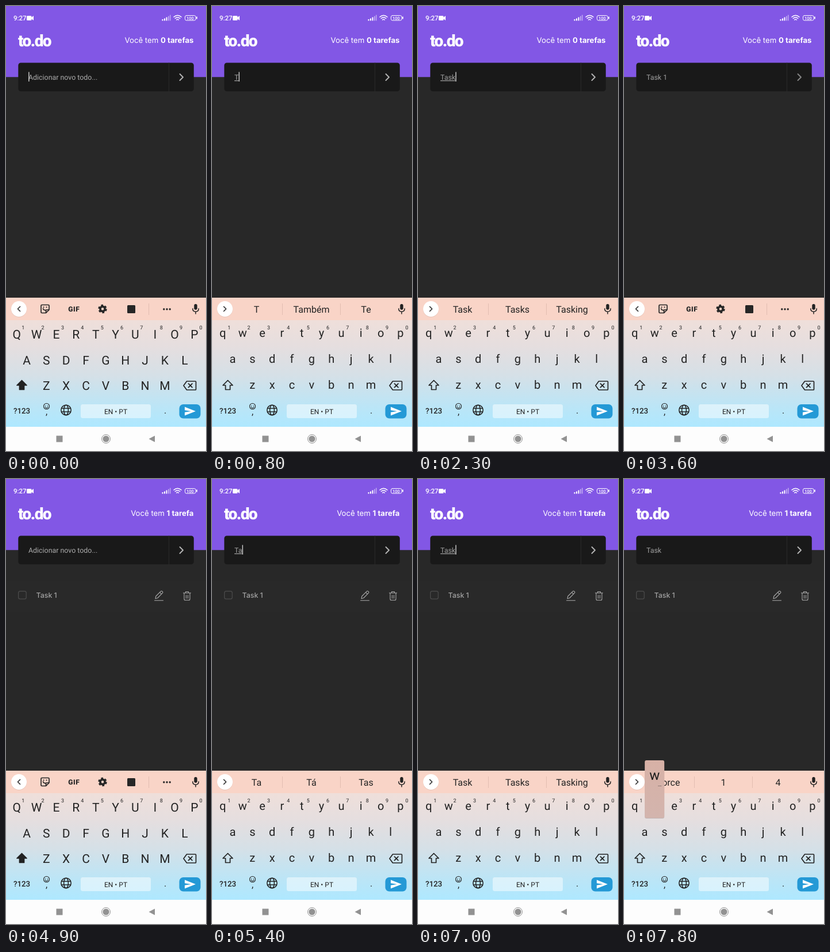
Write an HTML page that moves like this. It is 348 px wide and 772 px high and loops after 8 s.

```html
<!DOCTYPE html>
<html lang="pt">
<meta charset="utf-8">
<title>to.do</title>
<style>
html, body { margin: 0; width: 348px; height: 772px; overflow: hidden; background: #282828 }
svg { display: block }
text { font-family: Roboto, sans-serif; white-space: pre; text-rendering: geometricPrecision }
.inter { font-family: Inter, sans-serif }
.mid { text-anchor: middle }
.line { fill: none; stroke-linecap: round; stroke-linejoin: round }
</style>
<svg width="348" height="772" viewBox="0 0 348 772">
  <defs>
    <linearGradient id="sky" x1="0" y1="0" x2="0" y2="1">
      <stop stop-color="#efdfda"/><stop offset=".25" stop-color="#e5dedf"/>
      <stop offset=".52" stop-color="#d5e0e7"/><stop offset=".8" stop-color="#bce5f6"/>
      <stop offset="1" stop-color="#aee8ff"/>
    </linearGradient>
    <linearGradient id="skin" x1="0" y1="0" x2="0" y2="1">
      <stop stop-color="#d7b1a6"/><stop offset="1" stop-color="#d3b4ad"/>
    </linearGradient>
  </defs>

  <!-- header -->
  <path fill="#8257e5" d="M0 0h348v123.200H0z"/>
  <g fill="#fff">
    <text x="13" y="25" font-size="11.5" font-weight="500">9:27</text>
    <rect x="36" y="17" width="8.500" height="8" rx="1.500"/><path d="M44 20l4-3v8l-4-3z"/>
    <path d="M271.500 23h2v2.500h-2zM275 21.500h2v4h-2zM278.500 19.500h2v6h-2z"/>
    <path opacity=".5" d="M282 17.500h1.800v8H282zM285 15.500h1.500v10H285z"/>
    <text class="mid" x="320.500" y="23.600" font-size="7.500" font-weight="500">100</text>
    <path d="M331 18.500h1.800v4H331z"/>
    <text x="21" y="70" font-size="28" font-weight="800" letter-spacing="-1.6">to.do</text>
    <text class="inter" x="326.500" y="63.500" font-size="13.200" text-anchor="end">Você tem <tspan id="count" font-weight="700"></tspan></text>
  </g>
  <g class="line" stroke="#fff" stroke-width="1.600">
    <path d="M292 19q6.500-5.500 13 0M294.300 21.500q4.200-3.500 8.400 0M296.700 24q1.800-1.500 3.600 0"/>
    <rect x="311.500" y="16.500" width="18.500" height="8.500" rx="2.500" stroke-width="1"/>
  </g>

  <!-- new task field -->
  <rect x="21.300" y="98.400" width="305.500" height="49.600" rx="4.500" fill="#191919"/>
  <path d="M283.500 98.400v49.600" stroke="#2b2b2b"/>
  <text id="entry" x="39" y="128" font-size="12.400"></text>
  <path id="cursor" stroke="#c4c4c4" stroke-width="1.500" d="M0 114.500v16.500"/>
  <path id="submit" class="line" stroke="#b4b4b4" stroke-width="1.900" d="M302.500 118l5.500 5.500l-5.500 5.500"/>

  <!-- task row -->
  <g id="task">
    <path fill="#292929" d="M0 177h348v53H0z"/>
    <text class="inter" x="52.500" y="205.500" font-size="12.400" font-weight="500" fill="#a3a3a3">Task 1</text>
    <rect x="21.600" y="194.600" width="13.600" height="13.600" rx="3" fill="none" stroke="#4c4c4c" stroke-width="1.200"/>
    <path class="line" stroke="#aaa" stroke-width="1.100" d="M258.500 210.700h15M260 207.500l.7-4l8.800-8.800q1-.8 2 0l1 1q.8 1 0 2l-8.800 8.800zM267.500 196.700l3 3M308.500 197.800h13M312.500 197.500v-2h5v2M310 198v10q0 2.300 2 2.300h6q2 0 2-2.300v-10M313.500 201.500v5.500M316.500 201.500v5.500"/>
  </g>

  <!-- keyboard -->
  <path fill="#f9d4c7" d="M0 506h348v40H0z"/>
  <path fill="url(#sky)" d="M0 545h348v185H0z"/>
  <path fill="#fdfdfd" d="M0 730h348v42H0z"/>
  <circle cx="22.500" cy="526.300" r="13.500" fill="#b99a90" opacity=".35"/>
  <circle cx="22.500" cy="525.500" r="13.500" fill="#fff"/>
  <path id="fold" class="line" stroke="#333" stroke-width="1.700"/>
  <g fill="#222">
    <rect x="327.300" y="517" width="5.400" height="10" rx="2.700"/>
    <path class="line" stroke="#222" stroke-width="1.500" d="M324.800 525q0 5.200 5.200 5.200t5.200-5.200M330 530.500v3.500"/>
  </g>

  <g id="tools" fill="#262626">
    <path class="line" stroke="#262626" stroke-width="1.700" d="M62.500 518.500h11q1.500 0 1.500 1.500v7l-5.500 5.500h-7q-1.500 0-1.500-1.500v-11q0-1.500 1.500-1.500zM75 527h-4q-1.500 0-1.500 1.500v4M64.500 525q1.500 3.500 4.500 2.500"/>
    <circle cx="65.500" cy="522.500" r="1.100"/><circle cx="70.500" cy="522.500" r="1.100"/>
    <text class="mid" x="118.300" y="530" font-size="12" font-weight="900" letter-spacing=".6">GIF</text>
    <circle cx="168" cy="525.500" r="4.100" fill="none" stroke="#262626" stroke-width="3.600"/>
    <circle cx="168" cy="525.500" r="6.400" fill="none" stroke="#262626" stroke-width="2.600" stroke-dasharray="3.600 3.100"/>
    <rect x="211" y="519" width="14" height="14" rx="1.500"/>
    <path d="M248.500 516v20" stroke="#e2bdb1"/>
    <circle cx="274.800" cy="526" r="1.700"/><circle cx="280" cy="526" r="1.700"/><circle cx="285.200" cy="526" r="1.700"/>
  </g>
  <g id="hints" class="mid" fill="#222" font-size="16">
    <path d="M122.500 516v20M223.500 516v20" stroke="#e2bdb1"/>
    <text x="77.500" y="532"></text><text x="173" y="532"></text><text x="268" y="532"></text>
  </g>

  <g id="keys" class="mid" fill="#222"></g>
  <path id="shift" stroke="#222" stroke-width="1.700" stroke-linejoin="round" d="M27.500 649.500l8.500 8.500h-4.500v7.500h-8v-7.500H19z"/>
  <path class="line" stroke="#222" stroke-width="1.700" d="M314.500 651h15q1 0 1 1v13q0 1-1 1h-15l-5.500-7.500zM317.500 655.200l6.500 6.500M324 655.200l-6.500 6.500"/>
  <g class="mid" fill="#222">
    <text x="27.500" y="706.500" font-size="13.300" font-weight="500">?123</text>
    <text x="70.500" y="709" font-size="16">,</text>
    <text x="277" y="707" font-size="16">.</text>
    <rect x="130" y="691" width="122" height="24" rx="3.500" fill="#fff" opacity=".48"/>
    <text x="191" y="707.500" font-size="12">EN • PT</text>
    <circle cx="68.500" cy="694" r=".8"/><circle cx="72.500" cy="694" r=".8"/>
  </g>
  <g class="line" stroke="#222" stroke-width="1.100">
    <circle cx="70.500" cy="694.500" r="5"/><path d="M68 696.200q2.500 2.800 5 0"/>
    <g stroke-width="1.500"><circle cx="104.500" cy="701" r="8.700"/><ellipse cx="104.500" cy="701" rx="3.900" ry="8.700"/><path d="M96.500 698h16M96.500 704h16"/></g>
  </g>
  <rect x="301.500" y="691" width="37" height="24.500" rx="7" fill="#2499d6"/>
  <path fill="#fff" d="M311 695.500l19 7.500l-19 7.500v-5.800l11-1.700l-11-1.700z"/>

  <g fill="#929292">
    <path d="M87.500 745.500h11v11h-11zM259 745.500v11l-10.500-5.500z"/>
    <circle cx="174" cy="751" r="5.600"/><circle cx="174" cy="751" r="7.500" fill="none" stroke="#929292"/>
  </g>

  <g id="popup" class="mid">
    <rect x="-17" y="1" width="34" height="100" rx="3" fill="#6b5550" opacity=".3"/>
    <rect x="-17" width="34" height="100" rx="3" fill="url(#skin)"/>
    <text y="34" font-size="24" fill="#1c1c1c"></text>
    <text x="9" y="45" font-size="10" fill="#333">…</text>
  </g>
</svg>
<script>
const LOOP = 8000, STEP = 34.35;
const $ = id => document.getElementById(id);
const clamp = x => Math.min(1, Math.max(0, x));

const rows = [['qwertyuiop', 18.8], ['asdfghjkl', 36], ['zxcvbnm', 70.3]];
const keys = {};

function addText(x, y, size, content) {
  const el = document.createElementNS('http://www.w3.org/2000/svg', 'text');
  el.setAttribute('x', x);
  el.setAttribute('y', y);
  el.setAttribute('font-size', size);
  el.textContent = content;
  return $('keys').appendChild(el);
}

rows.forEach(([letters, left], row) => [...letters].forEach((letter, i) => {
  const x = left + STEP * i, y = 574.3 + 44.6 * row;
  keys[letter] = { x, y, row, el: addText(x, y, 20, letter) };
  if (!row) addText(x + 11, 560.5, 9, (i + 1) % 10);
}));

// Each entry changes part of the state from its time (ms) on.
const typedT = { text: 'T', pop: '', caps: false, cursor: true, composing: true, hints: ['T', 'Também', 'Te'] };
const typedTa = { text: 'Ta', pop: '', cursor: true, hints: ['Ta', 'Tá', 'Tas'] };
const typedTas = { text: 'Tas', pop: '', cursor: true, hints: ['Tas', '*Tás', 'Task'] };
const typedTask = { text: 'Task', pop: '', cursor: true, hints: ['Task', 'Tasks', 'Tasking'] };
const typedSpace = { text: 'Task ', cursor: true, composing: false, hints: ['Force', '1', '4'] };
const timeline = [
  [0, { text: '', cursor: true, caps: true, composing: false, hints: null, pop: '', face: '', tasks: 0 }],
  [400, { cursor: false }],
  [700, { pop: 't' }], [800, typedT],
  [900, { pop: 'a' }], [1000, typedTa],
  [1100, { pop: 's' }], [1300, typedTas],
  [1800, { pop: 'k', cursor: false }], [2000, typedTask],
  [2500, typedSpace],
  [2700, { pop: 'q' }], [3000, { face: '1' }],
  [3100, { text: 'Task 1', pop: '', face: '', cursor: true, hints: null }],
  [3600, { cursor: false }],
  [3800, { text: '', caps: true, tasks: 1 }],
  [4300, { cursor: true }], [4700, { cursor: false }],
  [5000, { pop: 't' }], [5100, typedT],
  [5300, { pop: 'a' }], [5400, typedTa],
  [5500, { pop: 's' }], [5600, { pop: '' }], [5800, typedTas],
  [6200, { cursor: false }],
  [6400, { pop: 'k' }], [6600, typedTask],
  [7100, { cursor: false }], [7300, typedSpace],
  [7800, { pop: 'w', cursor: false }]
];

const show = (el, on) => el.setAttribute('visibility', on ? 'visible' : 'hidden');

function draw(t) {
  const s = Object.assign({}, ...timeline.filter(([at]) => at <= t).map(([, change]) => change));
  const entry = $('entry');

  $('count').textContent = s.tasks ? '1 tarefa' : '0 tarefas';
  show($('task'), s.tasks);

  entry.textContent = s.text || 'Adicionar novo todo...';
  entry.setAttribute('fill', s.text ? '#a0a0a0' : '#adadad');
  entry.setAttribute('text-decoration', s.composing ? 'underline' : 'none');
  const typedWidth = s.text ? entry.getComputedTextLength() : 0;
  $('cursor').setAttribute('transform', `translate(${39.8 + typedWidth})`);
  show($('cursor'), s.cursor);
  const pressed = clamp((t - 3350) / 150) - clamp((t - 3800) / 250);
  $('submit').setAttribute('opacity', 1 - 0.3 * pressed);

  show($('tools'), !s.hints);
  show($('hints'), s.hints);
  $('fold').setAttribute('d', s.hints ? 'M20.500 521.500l4 4l-4 4' : 'M24.500 521.500l-4 4l4 4');
  $('hints').querySelectorAll('text').forEach((el, i) => {
    const word = s.hints ? s.hints[i] : '';
    el.textContent = word.replace('*', '');
    el.setAttribute('font-weight', word[0] === '*' ? 700 : 400);
  });

  const cased = c => s.caps ? c.toUpperCase() : c;
  for (const [letter, { y, el }] of Object.entries(keys)) {
    el.textContent = cased(letter);
    el.setAttribute('y', s.caps ? y + 2.7 : y);
    el.setAttribute('font-size', s.caps ? 21 : 20);
  }
  $('shift').setAttribute('fill', s.caps ? '#222' : 'none');

  show($('popup'), s.pop);
  if (s.pop) {
    const { x, row } = keys[s.pop];
    $('popup').setAttribute('transform', `translate(${x} ${488 + 44.6 * row})`);
    $('popup').querySelector('text').textContent = s.face || cased(s.pop);
  }
}

function frame() {
  draw(performance.now() % LOOP);
  requestAnimationFrame(frame);
}
frame();
</script>
</html>
```
